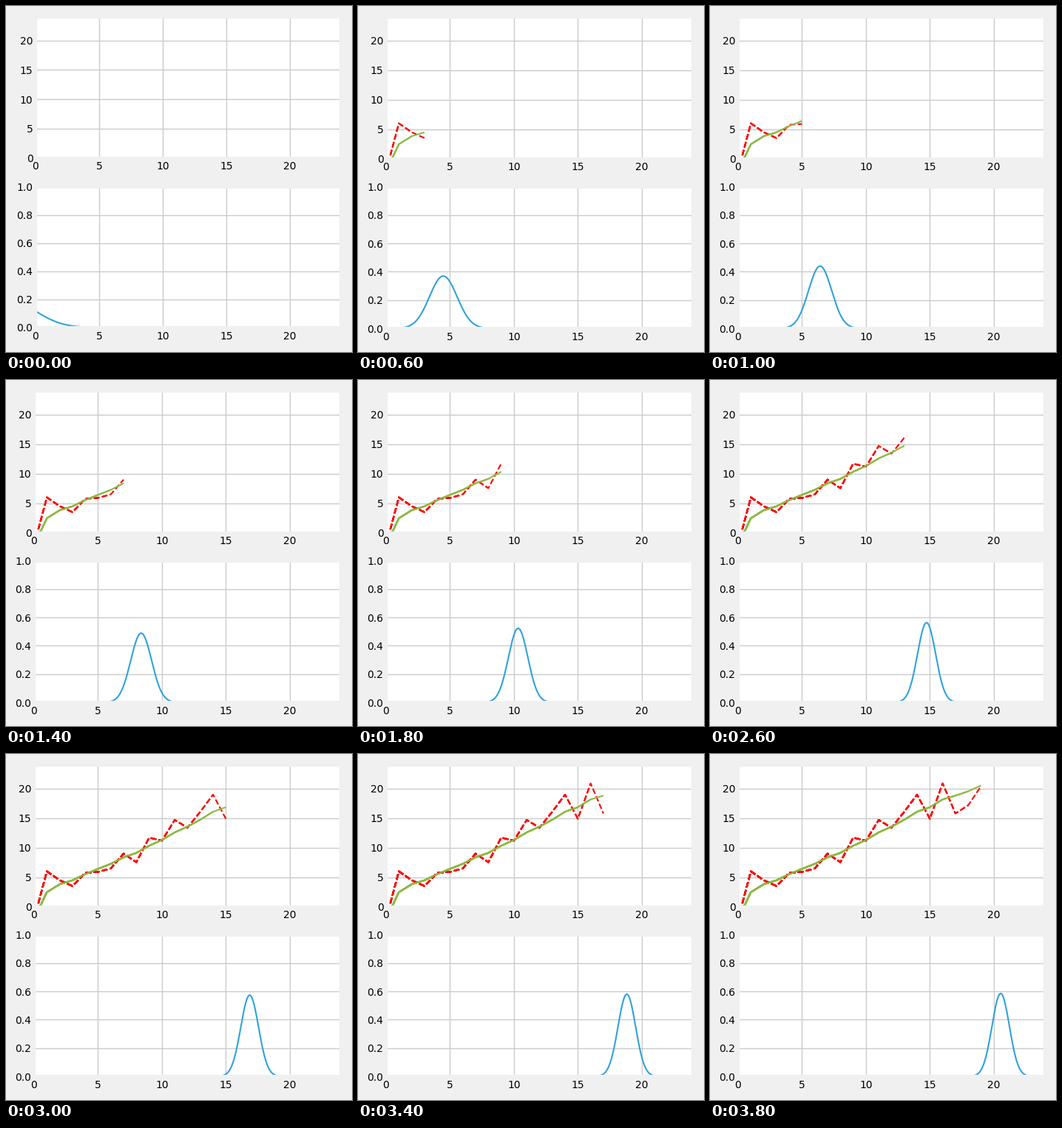
Write a matplotlib script that moves like this. It is 468 px wide and 468 px high and loops after 4000 ms.

```python
import numpy as np
import matplotlib.pyplot as plt
from matplotlib.animation import FuncAnimation

SIZE = 468
DPI = 100
STEPS = 20
SPAN = 24
BACK = "#f0f0f0"

# One-dimensional tracking: the body moves one unit per step
SENSOR_VAR = 4.5
MOVE_VAR = 0.05
READINGS = [-2.1, 6.0, 4.5, 3.5, 5.75, 5.9, 6.5, 9.0, 7.55, 11.7,
            11.2, 14.7, 13.4, 16.1, 19.0, 14.9, 20.9, 15.8, 17.2, 20.4]


def track(readings, mean=0.0, var=400.0):
    """Return the estimated mean and variance after each reading."""
    out = []
    for i, z in enumerate(readings):
        if i:
            mean, var = mean + 1, var + MOVE_VAR
        gain = var / (var + SENSOR_VAR)
        mean += gain * (z - mean)
        var *= 1 - gain
        out.append((mean, var))
    return np.array(out).T


def gaussian(x, mean, var):
    return np.exp(-(x - mean) ** 2 / (2 * var)) / np.sqrt(2 * np.pi * var)


plt.rcParams.update({
    "font.family": "DejaVu Sans",
    "font.size": 10,
    "lines.linewidth": 1.5,
    "lines.solid_capstyle": "butt",
    "axes.edgecolor": BACK,
    "axes.linewidth": 3,
    "axes.axisbelow": True,
    "grid.color": "#cbcbcb",
    "grid.linewidth": 1,
})

fig = plt.figure(figsize=(SIZE / DPI, SIZE / DPI), dpi=DPI, facecolor=BACK)
top = fig.add_axes([0.1, 0.55, 0.8, 0.4])
low = fig.add_axes([0.1, 0.07, 0.8, 0.4])

for ax in (top, low):
    ax.set_facecolor("white")
    ax.set_xlim(0, SPAN)
    ax.set_xticks(range(0, SPAN, 5))
    ax.tick_params(axis="x", length=0, pad=3.5)
    ax.tick_params(axis="y", length=0, pad=2.6)
    ax.grid(True)
top.set_ylim(0, SPAN)
top.set_yticks(range(0, SPAN, 5))
low.set_ylim(0, 1)
low.set_yticks(np.linspace(0, 1, 6))

means, variances = track(READINGS)
xs = np.linspace(0, SPAN, 1000)
curve, = low.plot([], [], color="#30a2da")

# Every step draws its whole history again over the older strokes
strokes = []
for n in range(1, STEPS + 1):
    t = range(n)
    strokes.append(top.plot(t, READINGS[:n], "r--")
                   + top.plot(t, means[:n], color="#8eba42"))


def place(ax, left, upper, right, lower):
    """Set the axes box from pixel edges measured from the top left."""
    ax.set_position([left / SIZE, 1 - lower / SIZE,
                     (right - left) / SIZE, (lower - upper) / SIZE])


def layout(left, height):
    place(top, left, 15, 453, 15 + height)
    place(low, left, 244.5, 453, 244.5 + height)


def draw(step):
    # The margins settle after the first step
    if step == 0:
        layout(40, 190.5)
    else:
        layout(38, 191.6)
    for i, pair in enumerate(strokes):
        for line in pair:
            line.set_visible(i <= step)
    curve.set_data(xs, gaussian(xs, means[step], variances[step]))
    return [curve]


def reset():
    return draw(0)


anim = FuncAnimation(fig, draw, frames=STEPS, init_func=reset,
                     interval=200, repeat=True, repeat_delay=0, blit=False)
plt.show()
```
